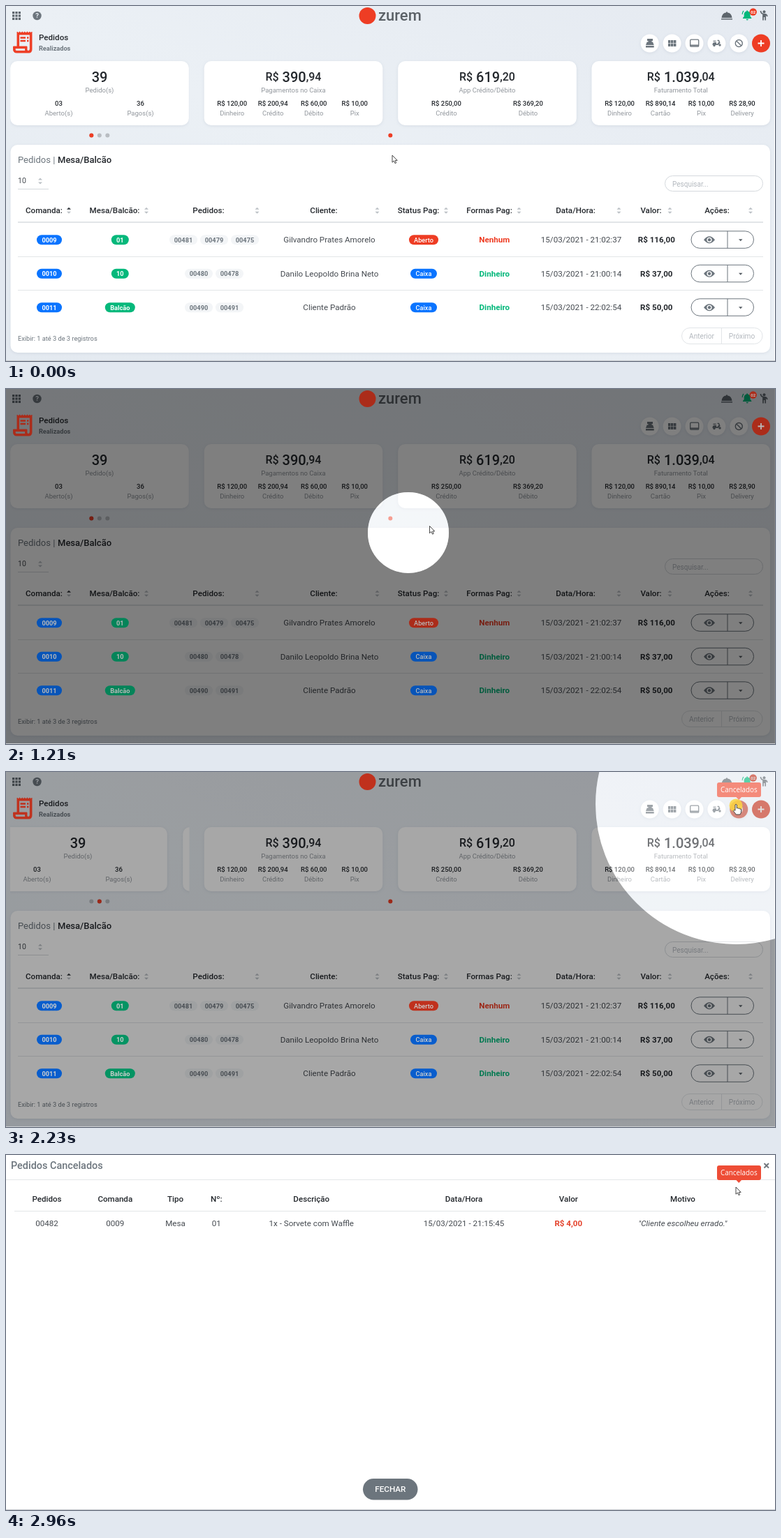
An HTML page for the animation above (3430 ms loop, 1101 px wide and 509 px high).

```html
<!DOCTYPE html>
<html lang="pt-BR">
<head>
<meta charset="utf-8">
<title>Pedidos</title>
<style>
html, body { margin: 0; width: 100%; height: 100%; overflow: hidden; background: #fff; }
svg { display: block; width: 1101px; height: 509px; font-family: Roboto, "Liberation Sans", sans-serif; }
.card { fill: #fff; filter: drop-shadow(0 1px 2px rgba(60, 80, 110, .1)); }
</style>
</head>
<body>
<svg id="stage" viewBox="0 0 1101 509">
  <defs>
    <linearGradient id="sky" x1="0" y1="1" x2="1" y2="0">
      <stop offset="0" stop-color="#e3e9f0"/>
      <stop offset=".5" stop-color="#ebf0f5"/>
      <stop offset="1" stop-color="#e5eaf1"/>
    </linearGradient>
    <clipPath id="slot"><rect x="6" y="72" width="256.5" height="106"/></clipPath>
  </defs>
  <rect width="1100" height="508" fill="url(#sky)"/>
  <g id="page"><g id="bar"></g><g clip-path="url(#slot)"><g id="slides"></g></g></g>
  <circle id="dim" fill="none" stroke="#000" stroke-width="2400"/>
  <g id="vivid"><g id="barVivid"></g></g>
  <g id="modal"><rect width="1101" height="509" fill="#fff"/><path d="M0 35.5H1101" stroke="#e4e6e9"/></g>
  <g id="content"></g>
  <path d="M0 508.5H1101" stroke="#c9ccd0"/>
  <g id="tip"></g>
  <circle id="glow" fill="#fff"/>
  <circle id="click" cx="1045" cy="48" r="9.5" fill="#fbd540" opacity=".85"/>
  <g id="cursor" fill="#fff" stroke="#333" stroke-width=".9" stroke-linejoin="round">
    <path id="arrow" d="M0 0V10.2L2.4 8 4 11.6 5.7 10.9 4.2 7.4H7.2Z"/>
    <path id="hand" d="M-1 1Q.2-.4 1.3 1V6Q2.6 5 3.6 6.4 5 5.6 5.8 7 7.4 6.6 7.6 8.2V11Q7.4 13 6 15H.2Q-1.4 12.4-3.8 9.6-3.4 7.6-1 9.2Z"/>
  </g>
</svg>
<script>
const $ = id => document.getElementById(id);
const RED = '#ee3d24', BLUE = '#0a74ff', GREEN = '#05b87b';
const INK = '#24282d', BODY = '#454a50', GRAY = '#6c757d', SOFT = '#92979d', LINE = '#e2e5e8';

function add(parent, tag, attrs, text) {
  const el = document.createElementNS('http://www.w3.org/2000/svg', tag);
  for (const k in attrs) el.setAttribute(k, attrs[k]);
  if (text != null) el.textContent = text;
  parent.appendChild(el);
  return el;
}
const label = (g, x, y, s, size, fill = BODY, weight = 400, anchor = 'middle') =>
  add(g, 'text', { x, y, 'font-size': size, fill, 'font-weight': weight, 'text-anchor': anchor }, s);
const box = (g, x, y, width, height, rx, fill, more) =>
  add(g, 'rect', { x, y, width, height, rx, fill, ...more });
const panel = (g, x, y, width, height) =>
  add(g, 'rect', { x, y, width, height, rx: 10, class: 'card' });
const dot = (g, cx, cy, r, fill) => add(g, 'circle', { cx, cy, r, fill });
const shape = (g, d, fill, more) => add(g, 'path', { d, fill, ...more });
const line = (g, d, stroke = LINE, width = 1) => shape(g, d, 'none', { stroke, 'stroke-width': width });
function pill(g, x, y, w, s, fill, color = '#fff', weight = 700) {
  box(g, x - w / 2, y - 7, w, 14, 7, fill);
  label(g, x, y + 3.3, s, 9.2, color, weight);
}
function sorter(g, x, y, active) {
  shape(g, `M${x - 3} ${y - 1.6}l3-3 3 3z`, active ? '#30353a' : '#bcc1c6');
  shape(g, `M${x - 3} ${y + 1.4}l3 3 3-3z`, '#bcc1c6');
}

const page = $('page'), vivid = $('vivid'), bar = $('bar'), barVivid = $('barVivid');

function drawHeader() {
  for (let i = 0; i < 9; i++) box(bar, 9 + i % 3 * 4.4, 8 + (i / 3 | 0) * 4.4, 3.2, 3.2, 0, '#5f676e');
  dot(bar, 44.5, 14, 6.2, GRAY);
  label(bar, 44.5, 17.4, '?', 9.5, '#e8edf3', 700);
  dot(barVivid, 517.5, 14, 12, RED);
  label(bar, 533, 21, 'zurem', 22, '#5b6167', 500, 'start');
  shape(bar, 'M1024.5 17Q1025.5 10 1031 9.6V8.4H1033V9.6Q1038.5 10 1039.5 17ZM1024 18H1040V19.6H1024Z', '#5f676e');
  shape(bar, 'M1055 18V17L1056.7 15V11.5Q1057.3 8 1060.3 7.5V6.4H1062V7.5Q1065.3 8 1065.6 11.5V15L1067.3 17V18ZM1059.5 18.8H1063Q1062.6 20.5 1061.2 20.5T1059.5 18.8Z', GREEN);
  line(bar, 'M1056 7Q1054.3 9 1054.2 12', GREEN, 1.2);
  dot(barVivid, 1069.7, 8.5, 5.2, RED);
  label(barVivid, 1069.7, 10.7, '02', 6, '#fff', 700);
  dot(bar, 1085.5, 8.2, 2, '#5f676e');
  line(bar, 'M1080.5 7Q1080.7 11.6 1085.5 11.6 1089.4 11.6 1089.8 15M1084 11.5V20.5M1087.2 11.5V20.5M1085.6 11.5V16', '#5f676e', 1.7);

  shape(vivid, 'M16 37l1.8 1.6 1.8-1.6 1.8 1.6 1.8-1.6 1.8 1.6 1.8-1.6 1.8 1.6 1.8-1.6 1.8 1.6 1.8-1.6 1.8 1.6 1.2-1.6V62Q37 67 33 67H15Q10.5 67 10.5 62V58H16ZM18.6 41V58H30V62.5Q30 64.4 32 64.4T34.3 62V41ZM13.2 60.7V62.5Q13.4 64.4 15 64.4H27.6V60.7Z', RED,
    { 'fill-rule': 'evenodd', stroke: RED, 'stroke-width': .9 });
  line(vivid, 'M20.5 45.5H28M20.5 50H28M30 45.5H32.4M30 50H32.4', RED, 2.7);
  label(page, 47, 49, 'Pedidos', 11.6, INK, 500, 'start');
  label(page, 47, 64, 'Realizados', 9.2, GRAY, 700, 'start');

  for (let i = 0; i < 5; i++) add(page, 'circle', { cx: 921.7 + i * 31.9, cy: 53.5, r: 13, class: 'card' });
  shape(page, 'M918 47H926V50H924.5V51.5H926L927.7 56H916L917.7 51.5H919.5V50H918ZM916 57H927.7V59.5H916Z', GRAY);
  for (let i = 0; i < 6; i++) box(page, 948 + i % 3 * 4, 49 + (i / 3 | 0) * 4.8, 3.4, 4.2, 0, GRAY);
  box(page, 979.7, 48.2, 12, 10, 1.2, 'none', { stroke: GRAY, 'stroke-width': 1.3 });
  line(page, 'M979.7 56.5H991.7', GRAY, 2);
  shape(page, 'M1011.5 55.5Q1011.5 52 1014.5 52H1017V54.3H1018.5L1020.6 51.5 1019.8 50H1018.5V48.8H1021L1022.6 53 1019.4 56H1011.5ZM1012.5 49.8H1016.5V51H1012.5Z', GRAY);
  dot(page, 1014, 56.5, 1.7, GRAY);
  dot(page, 1022, 56, 1.7, GRAY);
  const ban = 'M1044.3 53.5a5 5 0 1 0 10 0a5 5 0 1 0-10 0M1045.8 50l7 7';
  line(page, ban, GRAY, 1.4);
  const hover = add(vivid, 'g', { id: 'hover' });
  dot(hover, 1049.3, 53.5, 13, '#ed5b47');
  line(hover, ban, '#fff', 1.4);
  dot(vivid, 1081, 53.5, 13, RED);
  line(vivid, 'M1081 49V58M1076.5 53.5H1085.5', '#fff', 1.8);
}

function card(g, x, value, caption, parts) {
  panel(g, x - 127.8, 79, 255.6, 92);
  const title = label(g, x, 108.5, '', 20, INK, 500);
  const [whole, cents] = value.split(',');
  if (cents) {
    add(title, 'tspan', { 'font-size': 16, dy: -2 }, 'R$');
    add(title, 'tspan', { dy: 2 }, ' ' + whole);
    add(title, 'tspan', { 'font-size': 16, dy: -2 }, ',' + cents);
  } else title.textContent = whole;
  label(g, x, 124.2, caption, 9.5, SOFT);
  const gap = parts.length > 2 ? 58.5 : 117;
  parts.forEach(([sum, name], i) => {
    const px = x + (i - (parts.length - 1) / 2) * gap;
    label(g, px, 143.3, sum, 9.5, INK, 500);
    label(g, px, 156.6, name, 9.5, SOFT);
  });
}

function drawCards() {
  card($('slides'), 134, '39', 'Pedido(s)', [['03', 'Aberto(s)'], ['36', 'Pagos(s)']]);
  card($('slides'), 412, '1.277,00', 'Total em Vendas', [['R$ 232,00', 'A Receber']]);
  card(page, 411.5, '390,94', 'Pagamentos no Caixa',
    [['R$ 120,00', 'Dinheiro'], ['R$ 200,94', 'Crédito'], ['R$ 60,00', 'Débito'], ['R$ 10,00', 'Pix']]);
  card(page, 689, '619,20', 'App Crédito/Débito', [['R$ 250,00', 'Crédito'], ['R$ 369,20', 'Débito']]);
  card(page, 966.3, '1.039,04', 'Faturamento Total',
    [['R$ 120,00', 'Dinheiro'], ['R$ 890,14', 'Cartão'], ['R$ 10,00', 'Pix'], ['R$ 28,90', 'Delivery']]);
  for (const x of [122.3, 133.8, 145.3]) dot(page, x, 185.5, 3, '#b9bdc2');
  dot(page, 122.3, 185.5, 3, RED).id = 'active';
  dot(page, 550.3, 185.5, 3, RED);
}

function drawTable() {
  panel(page, 6.5, 199, 1087.5, 298);
  label(page, 17, 225, 'Pedidos |', 13, GRAY, 400, 'start');
  label(page, 74, 225, 'Mesa/Balcão', 13, INK, 500, 'start');
  label(page, 17, 254.3, '10', 10.5, BODY, 400, 'start');
  sorter(page, 49, 251);
  line(page, 'M17 262.5H61', '#d5d9dd');
  box(page, 943.5, 243.5, 140, 22, 11, '#fff', { stroke: '#d5d9dd' });
  label(page, 954, 258.5, 'Pesquisar...', 10, '#b3b8be', 400, 'start');

  [['Comanda:', 54.5, 90], ['Mesa/Balcão:', 155.5, 201], ['Pedidos:', 290, 359.5], ['Cliente:', 455, 531.5],
   ['Status Pag:', 590.5, 630], ['Formas Pag:', 692, 734.5], ['Data/Hora:', 815.5, 877.5],
   ['Valor:', 923.5, 950.5], ['Ações:', 1018, 1066]].forEach(([s, x, arrow], i) => {
    label(page, x, 296.7, s, 11.6, INK, 500);
    sorter(page, arrow, 293.3, !i);
  });
  line(page, 'M17 310H1084', '#d9dce0', 1.3);
  line(page, 'M17 359.5H1084M17 407.5H1084');

  [['0009', '01', ['00481', '00479', '00475'], 'Gilvandro Prates Amorelo', 'Aberto', 'Nenhum', '21:02:37', '116'],
   ['0010', '10', ['00480', '00478'], 'Danilo Leopoldo Brina Neto', 'Caixa', 'Dinheiro', '21:00:14', '37'],
   ['0011', 'Balcão', ['00490', '00491'], 'Cliente Padrão', 'Caixa', 'Dinheiro', '22:02:54', '50']
  ].forEach(([tab, table, orders, client, status, method, hour, sum], i) => {
    const y = 335.3 + i * 48.5, base = y + 3.7, open = status === 'Aberto';
    pill(vivid, 62, y, 36, tab, BLUE);
    pill(vivid, 163.3, y, table.length > 2 ? 43 : 25, table, GREEN);
    orders.forEach((s, k) => pill(page, 298 + (k - (orders.length - 1) / 2) * 44, y, 40, s, '#f3f5f7', GRAY));
    label(page, 463, base, client, 11.6);
    pill(vivid, 598, y, open ? 42 : 38, status, open ? RED : BLUE, '#fff', 500);
    label(page, 699.3, base, method, 11.6, open ? RED : GREEN, 700);
    label(page, 823.5, base, '15/03/2021 - ' + hour, 11.6);
    label(page, 931.3, base, `R$ ${sum},00`, 11.6, INK, 700);
    box(page, 981, y - 12.5, 89.5, 24.5, 12.2, '#fff', { stroke: GRAY });
    line(page, `M1033 ${y - 12.5}v24.5`, GRAY);
    shape(page, `M999 ${y}q8-10 16 0q-8 10-16 0z`, GRAY);
    dot(page, 1007, y, 3.6, '#fff');
    dot(page, 1007, y, 2.2, GRAY);
    shape(page, `M1049 ${y - 1}h5.5l-2.75 3z`, '#555c63');
  });

  label(page, 17, 480, 'Exibir: 1 até 3 de 3 registros', 9.25, GRAY, 400, 'start');
  box(page, 967.5, 461.5, 115.5, 23, 11.5, '#fff', { stroke: LINE });
  line(page, 'M1024.5 461.5V484.5');
  label(page, 996, 476.7, 'Anterior', 10.1, '#b3b8be');
  label(page, 1053.5, 476.7, 'Próximo', 10.1, '#b3b8be');
}

function drawModal() {
  const g = $('content');
  label(g, 7, 20.3, 'Pedidos Cancelados', 14.4, GRAY, 500, 'start');
  line(g, 'M1085.5 12l6.5 6.5M1092 12l-6.5 6.5', '#70767c', 1.9);
  line(g, 'M12 80.5H1088');
  [['Pedidos', '00482', 58.5], ['Comanda', '0009', 156.3], ['Tipo', 'Mesa', 242.5], ['Nº:', '01', 301.3],
   ['Descrição', '1x - Sorvete com Waffle', 437.3], ['Data/Hora', '15/03/2021 - 21:15:45', 655.5],
   ['Valor', 'R$ 4,00', 805.3], ['Motivo', '"Cliente escolheu errado."', 969]].forEach(([head, cell, x]) => {
    label(g, x, 67.3, head, 11.6, INK, 500);
    const price = head === 'Valor';
    const el = label(g, x, 101.5, cell, 11.6, price ? '#e4432c' : BODY, price ? 700 : 400);
    if (head === 'Motivo') el.setAttribute('font-style', 'italic');
  });
  box(g, 511, 464, 78.5, 30.5, 15.2, GRAY);
  label(g, 550.3, 483.4, 'FECHAR', 11.7, '#fff', 500);

  const tip = $('tip');
  box(tip, 1018, 15, 63, 21, 3, '#ee4d36');
  shape(tip, 'M1045 35.5h8.5l-4.25 4.5z', '#ee4d36');
  label(tip, 1049.4, 29, 'Cancelados', 9.9, '#fff').setAttribute('font-family', '"Open Sans", sans-serif');
}

drawHeader();
drawCards();
drawTable();
drawModal();

// Tracks: [ms, value] pairs, linear in between.
const LOOP = 3430;
const FOCUS = [[655, 0], [720, .23], [860, .89], [885, 1], [2088, 1], [2213, .694], [2481, .04], [2497, 0]];
const TRAVEL = [[1141, 553], [1208, 576], [1543, 789], [1744, 974], [1811, 1018], [1878, 1040], [1945, 1045]];
const HOVER = [[1878, 0], [2012, 1], [2414, 1], [2481, .3], [2615, 0]];
const TIP = [[1878, 0], [2012, 1]];
const SLIDE = [[2146, 0], [2213, 31], [2280, 160], [2347, 242], [2414, 268], [2481, 276], [2548, 278]];
const VEIL = [[2400, 0], [2481, .25], [2816, 1]];
const CONTENT = [[2816, 0], [2883, .5], [2950, 1]];

function at(track, t) {
  const i = track.findIndex(k => k[0] > t);
  if (i < 0) return track[track.length - 1][1];
  if (!i) return track[0][1];
  const [t0, a] = track[i - 1], [t1, b] = track[i];
  return a + (b - a) * (t - t0) / (t1 - t0);
}
function tick(t) {
  if (t < 720) return 0;
  if (t < 940) return Math.min(860, 720 + 70 * Math.floor((t - 720) / 70));
  return Math.min(2950, 940 + 67 * Math.floor((t - 940) / 67));
}
// Height along the way to the button, bowed by a few pixels.
function pathY(x, bow) {
  const u = (x - 553) / 492;
  return 214 - 168 * u + bow * Math.sin(Math.PI * u);
}
const set = (id, attrs) => { for (const k in attrs) $(id).setAttribute(k, attrs[k]); };

function render(t) {
  const p = at(FOCUS, t), r = 58 + 467 * (1 - p);
  const cx = at(TRAVEL, t), cy = pathY(cx, -1.4), mx = at(TRAVEL, t + 48);
  set('dim', { cx, cy, r: r + 1200, opacity: p / 2 });
  set('glow', { cx, cy, r, opacity: p / 2 });
  vivid.style.filter = p ? `brightness(${1 - p * .28})` : 'none';

  const onButton = t >= 1878 && t < 2414;
  set('cursor', { transform: `translate(${mx} ${pathY(mx, 2.4)})` });
  $('arrow').style.display = onButton ? 'none' : '';
  $('hand').style.display = onButton ? '' : 'none';
  $('click').style.display = t >= 2146 && t < 2347 ? '' : 'none';
  set('hover', { opacity: at(HOVER, t) });
  set('tip', { opacity: at(TIP, t) });

  set('slides', { transform: `translate(${-at(SLIDE, t)} 0)` });
  set('active', { cx: t < 2200 ? 122.3 : 133.8 });
  set('modal', { opacity: at(VEIL, t) });
  set('content', { opacity: at(CONTENT, t) });
  const shift = `translate(${t < 2400 ? 0 : 2} 0)`;
  set('bar', { transform: shift });
  set('barVivid', { transform: shift });
}

const start = performance.now();
function frame() {
  render(tick((performance.now() - start) % LOOP));
  requestAnimationFrame(frame);
}
frame();
</script>
</body>
</html>
```
